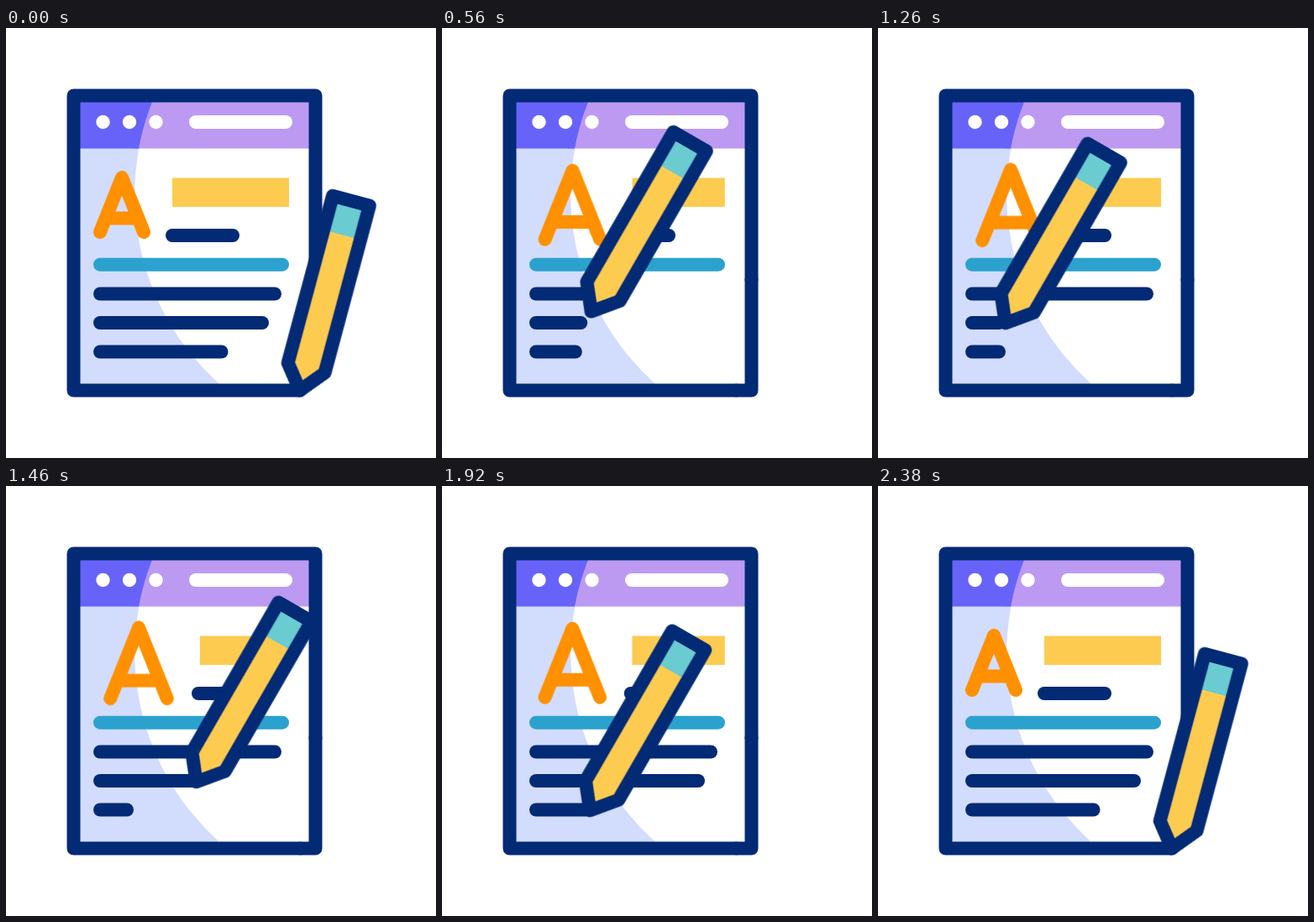
These frames come from a looping animation (512 px wide and 512 px high, 2400 ms). An HTML page:

```html
<!DOCTYPE html>
<html lang="en">
<head>
<meta charset="utf-8">
<title>Writing pencil</title>
<style>
  html, body { margin: 0; height: 100%; overflow: hidden; background: #fff; }
  svg { display: block; width: 100vw; height: 100vh; }

  .ink, .bar {
    fill: none;
    stroke: #032a75;
    stroke-width: 16;
    stroke-linecap: round;
    stroke-linejoin: round;
  }
  .bar { stroke-dasharray: var(--len) 999; }

  .anim { animation: 2400ms linear infinite; }
  .close  { animation-name: close; }
  .letter { animation-name: letter; stroke: #ff9100; vector-effect: non-scaling-stroke; }
  .block  { animation-name: block; transform-origin: 337px 0; }
  .sub    { animation-name: sub; }
  .row1   { animation-name: row1; }
  .row2   { animation-name: row2; }
  .row3   { animation-name: row3; }
  .move   { animation-name: move; offset-rotate: 0deg; transform-origin: 0 0; }
  .tilt   { animation-name: tilt; transform-origin: 0 0; }

  /* page corner behind the resting pencil */
  @keyframes close {
    0%, 3%, 98.6%, 100% { stroke-dashoffset: 149; }
    12%, 91% { stroke-dashoffset: 0; }
  }

  /* heading area */
  @keyframes letter {
    0%, 2.8%, 98.6%, 100% { transform: translate(138px, 178px) scale(1); }
    26.5%, 77.1% { transform: translate(158px, 168.5px) scale(1.3); }
  }
  @keyframes block {
    0%, 2.8%, 98.6%, 100% { transform: scaleX(1); }
    26.5%, 77.1% { transform: scaleX(.763); }
  }
  @keyframes sub {
    0%, 2.8%, 98.6%, 100% { stroke-dashoffset: 0; }
    26.5%, 77.1% { stroke-dashoffset: 31; }
  }

  /* text rows: shrink together, then written one by one */
  @keyframes row1 {
    0%, 2.8%, 43.1%, 100% { stroke-dashoffset: 0; }
    26.5%, 27% { stroke-dashoffset: 176; }
  }
  @keyframes row2 {
    0%, 2.8%, 69.4%, 100% { stroke-dashoffset: 0; }
    26.5%, 52.8% { stroke-dashoffset: 161; }
  }
  @keyframes row3 {
    0%, 2.8%, 86.7%, 100% { stroke-dashoffset: 0; }
    26.5%, 77.8% { stroke-dashoffset: 112.5; }
  }

  /* pencil: swing in, write three rows, swing back */
  @keyframes move {
    0%, 2.8% {
      offset-path: path("M383 310C440 385 270 244 210.5 208.5");
      offset-distance: 0%;
    }
    27% {
      offset-path: path("M383 310C440 385 270 244 210.5 208.5");
      offset-distance: 100%;
    }
    27.01% {
      offset-path: path("M210.5 208.5H385L210.5 243.5H374L210.5 277.5H326");
      offset-distance: 0px;
    }
    43.1% { 
      offset-path: path("M210.5 208.5H385L210.5 243.5H374L210.5 277.5H326");
      offset-distance: 174.5px;
    }
    52.8% {
      offset-path: path("M210.5 208.5H385L210.5 243.5H374L210.5 277.5H326");
      offset-distance: 352.5px;
    }
    69.4% {
      offset-path: path("M210.5 208.5H385L210.5 243.5H374L210.5 277.5H326");
      offset-distance: 516px;
    }
    77.8% {
      offset-path: path("M210.5 208.5H385L210.5 243.5H374L210.5 277.5H326");
      offset-distance: 683px;
    }
    86.7% {
      offset-path: path("M210.5 208.5H385L210.5 243.5H374L210.5 277.5H326");
      offset-distance: 798.5px;
    }
    86.71% {
      offset-path: path("M326 277.5C346 329 375 378 383 310");
      offset-distance: 0%;
    }
    98.6%, 100% {
      offset-path: path("M326 277.5C346 329 375 378 383 310");
      offset-distance: 100%;
    }
  }
  @keyframes tilt {
    0%, 2.8%, 98.6%, 100% { transform: rotate(15deg); }
    14%, 86.7% { transform: rotate(30deg); }
  }
</style>
</head>
<body>
<svg viewBox="0 0 512 512">
  <!-- page -->
  <path fill="#d2dcfd" d="M84 84H174V88A303 303 0 0 0 253 423V428H84Z"/>
  <path fill="#bc9af2" d="M150 84H364V143.500H150Z"/>
  <path fill="#6863f8" d="M84 84H175L174 88A303 303 0 0 0 158 143.500H84Z"/>
  <g fill="#fff">
    <circle cx="115.500" cy="112" r="8.200"/>
    <circle cx="147" cy="112" r="8.200"/>
    <circle cx="178.500" cy="112" r="8.200"/>
  </g>
  <path class="ink" style="stroke:#fff" d="M226 112H333"/>
  <path class="ink" d="M350 431.500H80.500V80.500H368.500V300"/>
  <path class="bar anim close" style="--len:149" d="M368.500 300V431.500H350"/>

  <!-- content -->
  <path class="ink anim letter" d="M-26 65L0 0L26 65M-19 48.500H19"/>
  <rect class="anim block" x="198" y="178.500" width="139" height="34.500" fill="#fdcb50"/>
  <path class="bar anim sub" style="--len:72" d="M270 247H198"/>
  <path class="ink" style="stroke:#2ba2ce" d="M112 281.700H329"/>
  <path class="bar anim row1" style="--len:208" d="M112 316.500H320"/>
  <path class="bar anim row2" style="--len:193" d="M112 351H305"/>
  <path class="bar anim row3" style="--len:144.5" d="M112 385.500H256.500"/>

  <!-- pencil -->
  <g class="anim move">
    <g class="anim tilt">
      <path fill="#fdcb50" d="M-22.700 -108H22.700V98L-.5 126L-22.700 98Z"/>
      <path fill="#6acbd1" d="M-22.700 -108H22.700V-66H-22.700Z"/>
      <path class="ink" d="M-22.700 -108H22.700V98L-.5 126L-22.700 98Z"/>
    </g>
  </g>
</svg>
</body>
</html>
```
